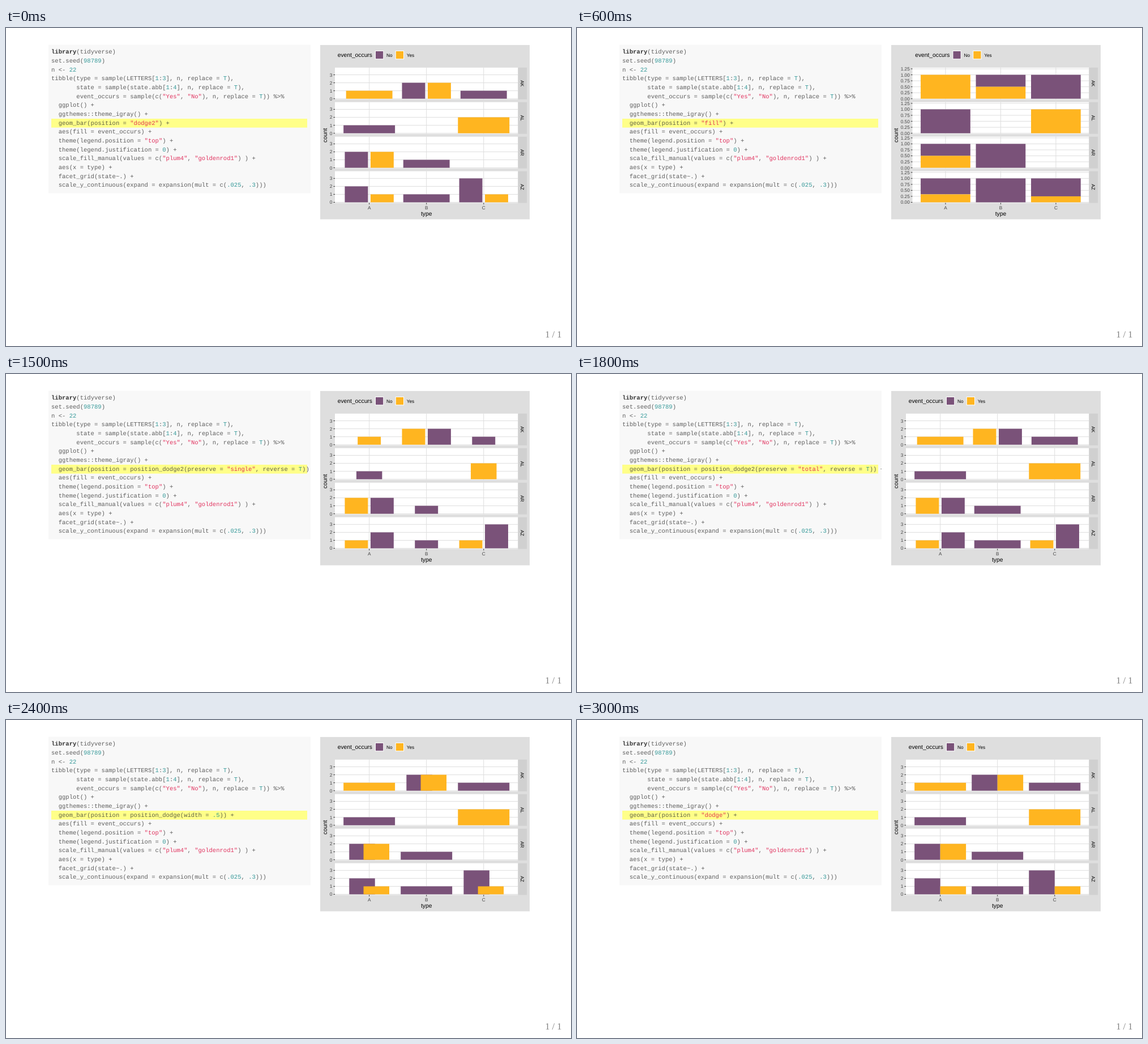
Recreate the animation shown at these times as an HTML page. Size 998 by 561 pixels, loop 3.3 s.

```html
<!DOCTYPE html>
<html lang="en">
<head>
<meta charset="utf-8">
<title>Bar positions</title>
<style>
  html, body { margin: 0; width: 100%; height: 100%; overflow: hidden; background: #fff; }
  svg { display: block; width: 998px; height: 561px; text-rendering: geometricPrecision; }
  .code { font: 10.557px "Liberation Mono", monospace; white-space: pre; fill: #333; fill-opacity: .78; }
  .key { font-weight: bold; fill-opacity: 1; }
  .str { fill: #d14; fill-opacity: .85; }
  .num { fill: #008080; }
  .title { font: 10.3px "Liberation Sans", sans-serif; fill: #000; }
  .label { font: 8.24px "Liberation Sans", sans-serif; fill: #000; }
  .tick { fill: #444; }
  .page { font: 16.5px "Liberation Serif", serif; fill: #808080; }
</style>
</head>
<body>
<svg viewBox="0 0 998 561">
  <defs><clipPath id="box"><rect x="75" y="29.5" width="463" height="262"/></clipPath></defs>
  <rect x="75" y="29.5" width="463" height="262" fill="#f8f8f8"/>
  <rect x="80" y="160" width="452" height="15.7" fill="#ffff88"/>
  <g id="code" clip-path="url(#box)"></g>
  <rect x="555" y="30" width="370" height="307.5" fill="#dedede"/>
  <g id="chart"></g>
  <text class="page" x="981.5" y="546.4" text-anchor="end">1 / 1</text>
</svg>
<script>
const STEP = 300;
const NO = '#7a5279', YES = '#ffb520', GRID = '#dedede';
const RIGHT = 904.4, TOP = 69.9, HEIGHT = 55.9, PITCH = 60.92;

// [No, Yes] counts for types A, B, C
const data = {
  AK: [[0, 1], [2, 2], [1, 0]],
  AL: [[1, 0], [0, 0], [0, 2]],
  AR: [[2, 2], [1, 0], [0, 0]],
  AZ: [[2, 1], [1, 0], [3, 1]]
};

const steps = [
  { arg: '"dodge2"', kind: 'dodge2' },
  { arg: '"identity"', kind: 'identity' },
  { arg: '"fill"', kind: 'fill', max: 1 },
  { arg: 'position_dodge2(preserve = "single")', kind: 'dodge2', single: true },
  { arg: 'position_dodge2(preserve = "single", padding = .5)', kind: 'dodge2', single: true, padding: .5 },
  { arg: 'position_dodge2(preserve = "single", reverse = T)', kind: 'dodge2', single: true, reverse: true },
  { arg: 'position_dodge2(preserve = "total", reverse = T)', kind: 'dodge2', reverse: true },
  { arg: 'position_dodge(preserve = "single")', kind: 'dodge', single: true },
  { arg: 'position_dodge(width = .5)', kind: 'dodge', width: .5 },
  { arg: '"stack"', kind: 'stack', max: 4 },
  { arg: '"dodge"', kind: 'dodge' }
];

const source = arg => `library(tidyverse)
set.seed(98789)
n <- 22
tibble(type = sample(LETTERS[1:3], n, replace = T),
       state = sample(state.abb[1:4], n, replace = T),
       event_occurs = sample(c("Yes", "No"), n, replace = T)) %>%
  ggplot() +
  ggthemes::theme_igray() +
  geom_bar(position = ${arg}) +
  aes(fill = event_occurs) +
  theme(legend.position = "top") +
  theme(legend.justification = 0) +
  scale_fill_manual(values = c("plum4", "goldenrod1") ) +
  aes(x = type) +
  facet_grid(state~.) +
  scale_y_continuous(expand = expansion(mult = c(.025, .3)))`;

const rect = (x, y, w, h, fill) =>
  `<rect x="${x}" y="${y}" width="${w}" height="${h}" fill="${fill}"/>`;
const text = (cls, x, y, str, anchor = 'start', turn = 0) =>
  `<text class="${cls}" text-anchor="${anchor}" transform="translate(${x} ${y}) rotate(${turn})">${str}</text>`;

function paint(line) {
  const escaped = line.replace(/</g, '&lt;').replace(/>/g, '&gt;');
  return escaped.replace(/("[^"]*")|(\blibrary\b)|(\bT\b|(?<![\w.])\.?\d+)/g, (s, str, key) =>
    `<tspan class="${str ? 'str' : key ? 'key' : 'num'}">${s}</tspan>`);
}

function drawCode(step) {
  return source(step.arg).split('\n')
    .map((line, i) => `<text class="code" x="80" y="${45.2 + 15.67 * i}">${paint(line)}</text>`)
    .join('');
}

// Bars as [offset of centre, width, base, height, colour] in axis units
function layout(step, pair, shared) {
  const { kind, single, reverse, padding = .1, width = .9 } = step;
  const bars = [[pair[0], NO], [pair[1], YES]].filter(b => b[0]);
  if (kind === 'identity') return bars.map(([n, c]) => [0, .9, 0, n, c]);
  if (kind === 'stack' || kind === 'fill') {
    const [no, yes] = pair, unit = kind === 'fill' ? no + yes || 1 : 1;
    return [[0, .9, yes / unit, no / unit, NO], [0, .9, 0, yes / unit, YES]];
  }
  if (reverse) bars.reverse();
  const slots = single ? 2 : bars.length;
  const pad = kind === 'dodge2' && shared ? 1 - padding : 1;
  const filled = kind === 'dodge2' ? bars.length : slots;
  const span = kind === 'dodge2' ? .9 / slots : width / slots;
  return bars.map(([n, c], i) => [(i - (filled - 1) / 2) * span, .9 / slots * pad, 0, n, c]);
}

function drawChart(step) {
  const max = step.max || 3, fill = step.kind === 'fill';
  const shift = fill ? 11.45 : 0, left = 581 + shift;
  const xUnit = (RIGHT - left) / 3.2, yUnit = HEIGHT / (max * 1.325);
  const xAt = i => left + (i + .6) * xUnit;
  const gap = fill ? .25 : 1, last = fill ? 1.25 : max === 4 ? 5 : 3;
  const middle = (left + RIGHT) / 2;
  let out = '';

  Object.entries(data).forEach(([state, pairs], row) => {
    const top = TOP + row * PITCH;
    const yAt = v => top + HEIGHT - (v + max * .025) * yUnit;
    out += rect(left, top, RIGHT - left, HEIGHT, '#fff');
    out += rect(RIGHT, top, 15.8, HEIGHT, '#d0d0d0');
    out += text('label', 909.2, top + HEIGHT / 2, state, 'middle', 90);
    for (let v = 0; v <= last; v += gap) {
      const y = yAt(v);
      out += rect(left, y - .5, RIGHT - left, 1, GRID);
      out += rect(left - 2.6, y - .5, 2.6, 1, '#333');
      out += text('label tick', left - 4.7, y + 2.95, fill ? v.toFixed(2) : v, 'end');
    }
    pairs.forEach((_, i) => out += rect(xAt(i) - .5, top, 1, HEIGHT, GRID));
    const shared = pairs.some(p => p[0] && p[1]);
    pairs.forEach((pair, i) => {
      for (const [dx, w, base, h, color] of layout(step, pair, shared)) {
        out += rect(xAt(i) + (dx - w / 2) * xUnit, yAt(base + h), w * xUnit, h * yUnit, color);
      }
    });
  });

  const bottom = TOP + 3 * PITCH + HEIGHT;
  ['A', 'B', 'C'].forEach((name, i) => {
    out += rect(xAt(i) - .5, bottom, 1, 2.6, '#333');
    out += text('label tick', xAt(i), 319.8, name, 'middle');
  });
  out += text('title', middle, 331, 'type', 'middle');
  out += text('title', 567.3, 189.3, 'count', 'middle', -90);

  out += text('title', 585.7 + shift, 51.2, 'event_occurs');
  [['No', NO, 652], ['Yes', YES, 687.8]].forEach(([name, color, x]) => {
    out += rect(x + shift, 40, 15.2, 15.2, '#fff');
    out += rect(x + 1 + shift, 41, 13.2, 13.2, color);
    out += text('label', x + 20 + shift, 50.6, name);
  });
  return out;
}

const code = document.getElementById('code');
const chart = document.getElementById('chart');
const start = performance.now();
let shown = -1;

function frame() {
  const index = Math.floor((performance.now() - start) / STEP) % steps.length;
  if (index !== shown) {
    shown = index;
    code.innerHTML = drawCode(steps[index]);
    chart.innerHTML = drawChart(steps[index]);
  }
  requestAnimationFrame(frame);
}
frame();
</script>
</body>
</html>
```
